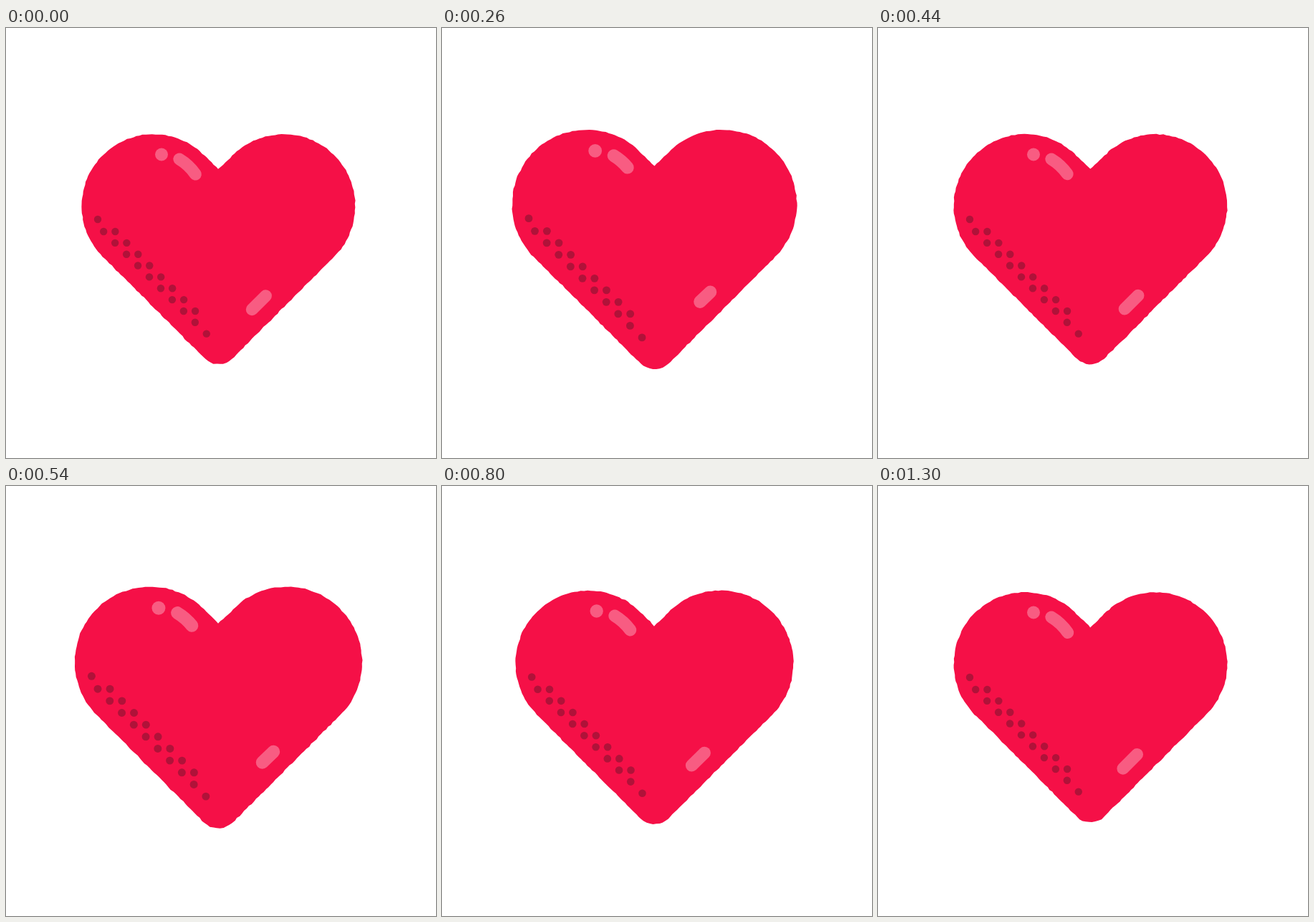
An HTML page with a canvas for the animation above (1320 ms loop, 600 by 600 pixels).

```html
<!DOCTYPE html>
<html lang="en">
<head>
<meta charset="utf-8">
<title>Beating heart</title>
<style>
  html, body { margin: 0; height: 100%; overflow: hidden; background: #fff; }
  canvas { display: block; width: 600px; height: 600px; }
</style>
</head>
<body>
<canvas id="stage" width="600" height="600"></canvas>
<script>
const ctx = document.getElementById('stage').getContext('2d');
const LOOP = 1320, STEP = 20;
const RED = '#f51047', DARK = '#b01239', LIGHT = '#f85c82';
const CENTER_X = 297, CENTER_Y = 300;
const rad = deg => deg * Math.PI / 180;

function smooth(u) {
  u = Math.min(1, Math.max(0, u));
  return u * u * (3 - 2 * u);
}

// Eases from 0 up to 1 at the peak and back to 0.
function pulse(t, start, peak, end) {
  return t < peak ? smooth((t - start) / (peak - start)) : smooth((end - t) / (end - peak));
}

const beatScale = t => 1 + 0.06 * pulse(t, 0, 182, 392) + 0.098 * pulse(t, 438, 637, 857);

// The highlight starts to move shortly before the loop wraps.
const shineSlide = t => 21 * (pulse(t, -50, 190, 450) + pulse(t, 375, 640, 900) + pulse(t - LOOP, -50, 190, 450));

// Seeded random number from -1 to 1.
function noise(seed) {
  const v = Math.sin(seed * 12.9898) * 43758.5453;
  return (v - Math.floor(v)) * 2 - 1;
}

const heart = document.createElementNS('http://www.w3.org/2000/svg', 'path');
heart.setAttribute('d', `M296.5 197 L275.2 176.3 A100 100 0 0 0 133.8 317.7
  L277 461 A27.5 27.5 0 0 0 316 461 L459.2 317.7 A100 100 0 0 0 317.8 176.3 Z`);
const outline = [];
for (let s = 0; s < heart.getTotalLength(); s += 4.5) outline.push(heart.getPointAtLength(s));

function drawHeart(frame) {
  ctx.beginPath();
  outline.forEach(({ x, y }, i) => {
    const seed = i + frame * 311;
    ctx.lineTo(x + noise(seed) * 0.55, y + noise(seed + 0.5) * 0.55);
  });
  ctx.fillStyle = RED;
  ctx.fill();
}

function disc(x, y, r, color) {
  ctx.beginPath();
  ctx.arc(x, y, r, 0, Math.PI * 2);
  ctx.fillStyle = color;
  ctx.fill();
}

function drawDots() {
  disc(128, 267, 5.2, DARK);
  for (let i = 0; i < 10; i++) {
    const x = 136.2 + 15.95 * i, y = 284 + 15.85 * i;
    disc(x, y, 5.2, DARK);
    if (i < 8) disc(x + 16.2, y, 5.2, DARK);
  }
}

function drawShine(slide) {
  ctx.strokeStyle = LIGHT;
  ctx.lineWidth = 17;
  ctx.lineCap = 'round';
  disc(217, 176.5, 9, LIGHT);

  ctx.beginPath();
  ctx.arc(204, 246, 73.5, rad(-59), rad(-34 - 0.34 * slide));
  ctx.stroke();

  ctx.beginPath();
  ctx.moveTo(361 + 0.6 * slide, 375 - 0.54 * slide);
  ctx.lineTo(341 + 0.96 * slide, 395 - 0.94 * slide);
  ctx.stroke();
}

function draw(now) {
  const frame = Math.floor(now % LOOP / STEP);
  const t = frame * STEP;
  const scale = beatScale(t);

  ctx.fillStyle = '#fff';
  ctx.fillRect(0, 0, 600, 600);
  ctx.save();
  ctx.translate(CENTER_X, CENTER_Y);
  ctx.scale(scale, scale);
  ctx.translate(-CENTER_X, -CENTER_Y);
  drawHeart(frame);
  drawDots();
  drawShine(shineSlide(t));
  ctx.restore();
}

const start = performance.now();
function tick() {
  draw(performance.now() - start);
  requestAnimationFrame(tick);
}
tick();
</script>
</body>
</html>
```
